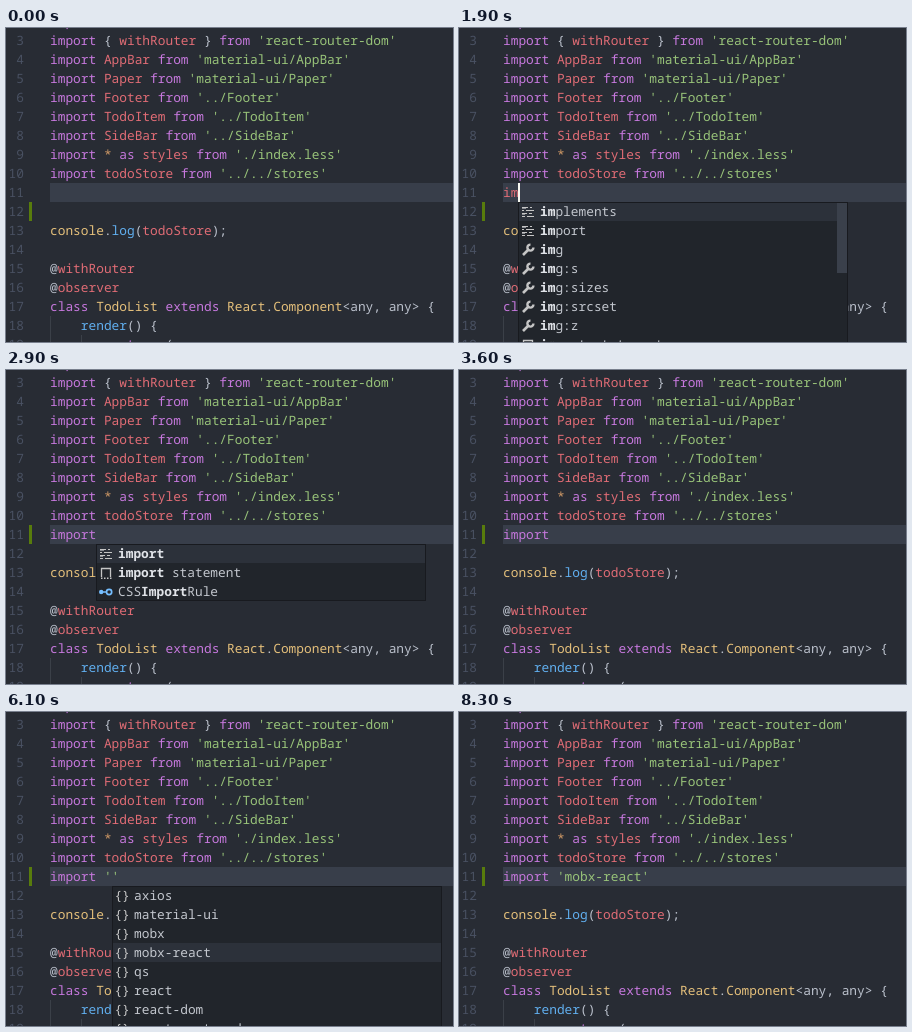
Recreate the animation shown at these times as an HTML page with a canvas. Size 447 by 314 pixels, loop 8400 ms.

```html
<!DOCTYPE html>
<html lang="en">
<head>
<meta charset="utf-8">
<title>Import completion</title>
<style>
  html, body { margin: 0; width: 100%; height: 100%; overflow: hidden; background: #282c34; }
  canvas { display: block; }
</style>
</head>
<body>
<canvas id="stage" width="447" height="314"></canvas>
<script>
const ctx = document.getElementById('stage').getContext('2d');
const LOOP = 8400, ROW = 19, LEFT = 44, CHAR = 7.697, BASE = 14;
const FONT = '12.83px "Noto Sans Mono", monospace';
const C = {
  back: '#282c34', current: '#383e4a', number: '#495162', guide: '#3b4048', mark: '#587c0c',
  plain: '#bbc1cc', key: '#c678dd', name: '#e06c75', str: '#98c379',
  type: '#e5c07b', call: '#61afef', num: '#d19a66',
  list: '#21252b', pick: '#2c313a', edge: '#181a1f', slider: '#3a404b', item: '#c3c7ce', match: '#e0e3e8'
};

// Code as lists of [colour, text] pairs, keyed by line number
const load = (what, path) => [['key', 'import '], ...what, ['key', ' from '], ['str', `'${path}'`]];
const name = text => [['name', text]];
const braces = text => [['plain', '{ '], ['name', text], ['plain', ' }']];
const code = {
  2: load(braces('observer'), 'mobx-react'),
  3: load(braces('withRouter'), 'react-router-dom'),
  4: load(name('AppBar'), 'material-ui/AppBar'),
  5: load(name('Paper'), 'material-ui/Paper'),
  6: load(name('Footer'), '../Footer'),
  7: load(name('TodoItem'), '../TodoItem'),
  8: load(name('SideBar'), '../SideBar'),
  9: load([['num', '*'], ['key', ' as '], ['name', 'styles']], './index.less'),
  10: load(name('todoStore'), '../../stores'),
  13: [['type', 'console'], ['plain', '.'], ['call', 'log'], ['plain', '('], ['name', 'todoStore'], ['plain', ');']],
  15: [['plain', '@'], ['name', 'withRouter']],
  16: [['plain', '@'], ['name', 'observer']],
  17: [['key', 'class '], ['type', 'TodoList'], ['key', ' extends '], ['type', 'React'], ['plain', '.'],
    ['type', 'Component'], ['plain', '<any, any> {']],
  18: [['plain', '    '], ['call', 'render'], ['plain', '() {']],
  19: [['plain', '        '], ['key', 'return '], ['plain', '(']]
};

// Completion lists: icon and labels
const group = (icon, labels) => labels.split(' ').map(label => [icon, label]);
const statement = ['snippet', 'import statement'];
const rule = ['link', 'CSSImportRule'];
const lists = {
  im: [...group('keyword', 'implements import'), ...group('wrench', 'img img:s img:sizes img:srcset img:z'), statement],
  impo: [['keyword', 'import'], statement, rule, ['link', 'DOMImplementation'],
    ...group('cube', 'decodeURIComponent encodeURIComponent')],
  import: [['keyword', 'import'], statement, rule],
  modules: group('module', 'axios material-ui mobx mobx-react qs react react-dom react-router-dom')
};
lists.imp = [['keyword', 'implements'], ...lists.impo, ...group('link', 'MimeType MimeTypeArray')];

const timeline = [
  [0, { text: '', caret: false, mark: 12, list: '', pick: 0 }],
  [1000, { caret: true }], [1500, { caret: false }],
  [1700, { text: 'i', caret: true }],
  [1800, { text: 'im' }],
  [1900, { list: 'im' }],
  [2000, { text: 'imp', list: 'imp' }],
  [2200, { text: 'impo', list: 'impo' }],
  [2300, { text: 'impor', list: 'import' }],
  [2500, { text: 'import' }],
  [2700, { mark: 11 }],
  [2900, { caret: false }],
  [3200, { text: 'import ', list: '', caret: true }],
  [3600, { caret: false }],
  [3800, { text: "import ''", list: 'modules', caret: true }],
  [4100, { caret: false }],
  [4200, { pick: 1 }], [4400, { pick: 2 }],
  [4600, { caret: true }], [4700, { pick: 3 }],
  [5100, { caret: false }], [5600, { caret: true }], [6100, { caret: false }],
  [6300, { text: "import 'mobx-react'", list: '', caret: true }],
  [6700, { caret: false }], [7200, { caret: true }], [7700, { caret: false }],
  [8100, { caret: true }], [8300, { caret: false }]
];

const lineTop = n => 155 + (n - 11) * ROW;

function box(color, x, y, w, h) {
  ctx.fillStyle = color;
  ctx.fillRect(x, y, w, h);
}

function write(text, x, y, color, bold) {
  ctx.font = (bold ? 'bold ' : '') + FONT;
  ctx.fillStyle = color;
  ctx.fillText(text, x, y);
}

function writeTokens(tokens, y) {
  let col = 0;
  for (const [color, text] of tokens) {
    write(text, LEFT + col * CHAR, y, C[color]);
    col += text.length;
  }
}

function trace(color, width, path) {
  ctx.strokeStyle = color;
  ctx.lineWidth = width;
  ctx.stroke(new Path2D(path));
}

// Icons sit in a 16 by 16 square
const icons = {
  keyword() {
    trace('#c5c5c5', 1, 'M2 3.5h6M10 3.5h2M2 6.5h2M6 6.5h8M2 9.5h5M9 9.5h3M2 12.5h3M7 12.5h7');
    trace('#8a8d93', 1, 'M2 4.5h4M2 10.5h3');
  },
  wrench() {
    trace('#c5c5c5', 2.6, 'M3 13L9 7');
    trace('#c5c5c5', 2.4, 'M10.5 2.6A3 3 0 1 0 13.4 5.5');
  },
  snippet() {
    trace('#c5c5c5', 1.3, 'M3.5 12V3.5H12.5V12');
    trace('#c5c5c5', 1.4, 'M3 13.3h1.5M6 13.3h1.5M9 13.3h1.5M12 13.3h1.5');
  },
  link() {
    ctx.fillStyle = '#75beff';
    ctx.fill(new Path2D('M1 8a2.2 2.2 0 1 0 4.4 0a2.2 2.2 0 1 0-4.4 0'));
    trace('#75beff', 1.7, 'M5 8h3.5M8.5 8a2.6 2.6 0 1 0 5.2 0a2.6 2.6 0 1 0-5.2 0');
  },
  cube() {
    trace('#b180d7', 1.2, 'M8 2L13.2 4.8V11L8 14L2.8 11V4.8ZM2.8 4.8L8 7.6L13.2 4.8M8 7.6V14');
  },
  module() {
    write('{}', 0.4, 12, '#c5c5c5');
  }
};

// Letters of the typed query stand out, in order, ignoring case
function writeLabel(label, query, x, y) {
  let hit = 0;
  [...label].forEach((letter, i) => {
    const bold = letter.toLowerCase() === query[hit];
    if (bold) hit++;
    write(letter, x + i * CHAR, y, bold ? C.match : C.item, bold);
  });
}

function drawList({ list, text, pick }, x) {
  const items = lists[list], top = lineTop(12), width = 330;
  const query = list === 'modules' ? '' : text;
  const height = items.length * ROW;
  box(C.list, x, top, width, height);
  box(C.pick, x, top + pick * ROW, width, ROW);
  items.forEach(([icon, label], i) => {
    const y = top + i * ROW;
    ctx.save();
    ctx.translate(x + 2, y + 2);
    icons[icon]();
    ctx.restore();
    writeLabel(label, query, x + 22, y + BASE);
  });
  if (list === 'im') box(C.slider, x + width - 11, top + 1, 10, 70);
  ctx.strokeStyle = C.edge;
  ctx.lineWidth = 1;
  ctx.strokeRect(x + 0.5, top + 0.5, width - 1, height - 1);
}

function draw(time) {
  const state = {};
  for (const [start, change] of timeline) if (start <= time) Object.assign(state, change);
  const { text, caret, mark, list } = state;

  box(C.back, 0, 0, 447, 314);
  box(C.current, LEFT, lineTop(11), 447 - LEFT, ROW);
  box(C.guide, LEFT, lineTop(18), 1, 2 * ROW);
  box(C.guide, 75, lineTop(19), 1, ROW);
  box(C.mark, 23, lineTop(mark), 3, ROW);
  for (let n = 2; n <= 19; n++) {
    const y = lineTop(n) + BASE;
    write(String(n), 18 - String(n).length * CHAR, y, C.number);
    if (code[n]) writeTokens(code[n], y);
  }
  const done = text.startsWith('import');
  writeTokens([[done ? 'key' : 'name', text.slice(0, 6)], ['str', text.slice(6)]], lineTop(11) + BASE);

  const col = text.length - text.endsWith("'");
  const x = Math.round(LEFT + col * CHAR);
  if (list) drawList(state, x);
  if (caret) box('#f8f8f0', x, lineTop(11), 2, ROW);
}

ctx.textRendering = 'geometricPrecision';
const begin = performance.now();
function tick() {
  draw((performance.now() - begin) % LOOP);
  requestAnimationFrame(tick);
}
tick();
</script>
</body>
</html>
```
